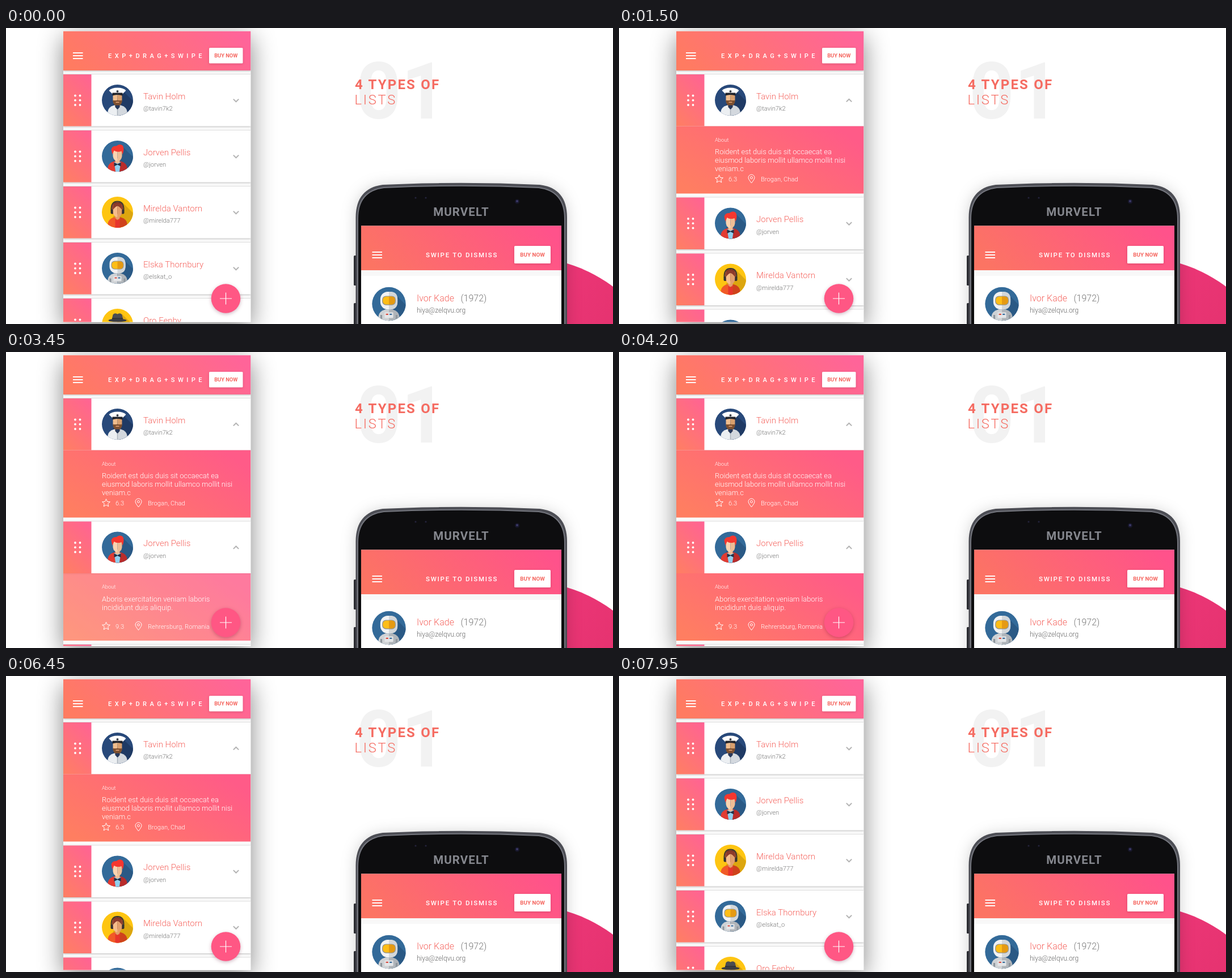
An HTML page that plays this animation: 1070 by 523 pixels, repeating every 8 s.

```html
<!DOCTYPE html>
<html lang="en">
<head>
<meta charset="utf-8">
<title>List types</title>
<style>
  html, body { margin: 0; width: 100%; height: 100%; overflow: hidden; background: #fff; }
  svg { display: block; width: 1070px; height: 523px; font-family: Roboto, sans-serif; }
  .name { font-weight: 300; font-size: 15px; fill: #f5655f; }
  .light { font-weight: 300; }
  .raised { filter: drop-shadow(0 1.5px 1.5px rgba(0,0,0,.25)); }
  .button { filter: drop-shadow(0 1px 2px rgba(90,0,30,.22)); }
  .fab { filter: drop-shadow(0 2px 3px rgba(90,0,40,.28)); }
  .deep { filter: drop-shadow(0 11px 22px rgba(0,0,0,.48)); }
  .soft { filter: drop-shadow(0 2px 13px rgba(0,0,0,.18)); }
</style>
</head>
<body>
<svg id="stage" viewBox="0 0 1070 523"></svg>
<script>
const LOOP = 8000, PITCH = 99, ROW_TOP = 82, ROW_H = 91.5, PANEL_H = 119;
const GROW = 118.5;

const rows = [
  { name: 'Tavin Holm', handle: '@tavin7k2', avatar: 'sailor',
    about: ['Roident est duis duis sit occaecat ea', 'eiusmod laboris mollit ullamco mollit nisi', 'veniam.c'],
    score: '6.3', place: 'Brogan, Chad',
    open: 270, close: 6750 },
  { name: 'Jorven Pellis', handle: '@jorven', avatar: 'redhead',
    about: ['Aboris exercitation veniam laboris', 'incididunt duis aliquip.'],
    score: '9.3', place: 'Rehrersburg, Romania',
    open: 2670, close: 4850 },
  { name: 'Mirelda Vantorn', handle: '@mirelda777', avatar: 'operator' },
  { name: 'Elska Thornbury', handle: '@elskat_o', avatar: 'astronaut' },
  { name: 'Oro Fenby', handle: '@orofen', avatar: 'hat' }
];

const rect = (x, y, w, h, fill, extra = '') =>
  `<rect x="${x}" y="${y}" width="${w}" height="${h}" fill="${fill}" ${extra}/>`;
const path = (d, fill, extra = '') => `<path d="${d}" fill="${fill}" ${extra}/>`;
const circle = (x, y, r, fill, extra = '') =>
  `<circle cx="${x}" cy="${y}" r="${r}" fill="${fill}" ${extra}/>`;
const text = (x, y, size, fill, str, extra = '') =>
  `<text x="${x}" y="${y}" font-size="${size}" fill="${fill}" ${extra}>${str}</text>`;
const gradient = (id, [x1, y1, x2, y2], from, to, extra = '') =>
  `<linearGradient id="${id}" x1="${x1}" y1="${y1}" x2="${x2}" y2="${y2}" ${extra}>
    <stop stop-color="${from}"/><stop offset="1" stop-color="${to}"/></linearGradient>`;
const menuIcon = (x, y) => [0, 5, 10].map(d => rect(x, y + d - 1, 17.5, 1.9, '#fff')).join('');
const buyButton = (x, y, w, h, size) =>
  `<g class="button">${rect(x, y, w, h, '#fff', 'rx="1.5"')}</g>` +
  text(x + w / 2, y + h / 2 + size * .36, size, '#f5665f', 'BUY NOW', 'font-weight="700" text-anchor="middle"');

// Avatars are drawn around (0,0) inside a circle of radius 27.5.
const suit = (left, right) =>
  path('M-17 30V20Q-16 12-6 9H0V30Z', left) + path('M17 30V20Q16 12 6 9H0V30Z', right);
const head = (left, right) =>
  rect(-4, 4, 8, 9, right) + path('M0-13H-8V0Q-7 8 0 9Z', left) + path('M0-13H8V0Q7 8 0 9Z', right);
const longShadow = fill => path('M8-18L34 8V34H0L-10 12Z', fill);

const avatars = {
  sailor: circle(0, 0, 28, '#28497a') + longShadow('#1f3a64') + suit('#eceff2', '#d3d8de') +
    head('#f0bd8d', '#d99f6d') +
    path('M-8 0Q-4 1 0 0Q4 1 8 0V3Q6 10 0 11Q-6 10-8 3Z', '#7d5030') + rect(-3, 3, 6, 1.5, '#e8a579') +
    path('M-4 12L0 17L4 12V9H-4Z', '#26395c') + rect(-.7, 16, 1.4, 14, '#a9b1ba') +
    path('M-15-17Q-10-22 0-22Q10-22 15-17L9-11H-9Z', '#fff') + path('M-9-13H9V-8Q0-11-9-8Z', '#20232b') +
    circle(0, -15.5, 2, '#3a3f4a'),
  redhead: circle(0, 0, 28, '#336a99') + longShadow('#2a5985') + suit('#e23b32', '#b92c2b') +
    head('#fbd3b0', '#eebd95') +
    path('M-9-3L-11-12Q-9-19-2-18Q4-23 9-19Q13-14 9-3L7-9Q0-6-6-10Z', '#f5372f') +
    path('M-6 10L0 13L6 10L3 30H-3Z', '#8fd0ef') +
    path('M-6 11L0 14L6 11V18L0 15L-6 18Z', '#263247'),
  operator: circle(0, 0, 28, '#fec512') + longShadow('#dca60f') +
    path('M-10 3V-9Q-9-18 0-18Q9-18 10-9V3Z', '#7b3327') + suit('#f15a27', '#cf421c') +
    head('#f6bd8c', '#e3a06c') + path('M-8-4V-13Q0-19 8-13V-4Q4-10 0-11Q-4-10-8-4Z', '#8d3b2b') +
    path('M-11-3Q-12-19 0-19Q12-19 11-3', 'none', 'stroke="#333" stroke-width="1.8"') +
    rect(-12, -5, 4, 8, '#333', 'rx="2"') + rect(8, -5, 4, 8, '#333', 'rx="2"') +
    path('M-4 10L0 15L4 10V30H-4Z', '#e7352c'),
  astronaut: circle(0, 0, 28, '#336a99') + longShadow('#2a5985') + suit('#cfd2d5', '#b0b5ba') +
    path('M-14 30V18H-11V30M11 30V18H14V30', '#8f969d') +
    rect(-14, -20, 28, 29, '#f1f2f3', 'rx="12"') + path('M0-20H2Q14-20 14-8V-3Q14 9 2 9H0Z', '#d3d7da') +
    rect(-11, -13, 22, 15, '#8d8f90', 'rx="6"') + rect(-10, -12, 20, 13, '#fdbd17', 'rx="5.5"') +
    path('M0-12H4.5Q10-12 10-6Q10 1 4.5 1H0Z', '#e59a13') +
    rect(-7, 14, 14, 9, '#e4e6e8', 'rx="1"') + rect(-5, 16, 4, 2, '#d9493c') + rect(1, 16, 4, 2, '#356b9b'),
  hat: circle(0, 0, 28, '#fec512') + longShadow('#dca60f') + suit('#565a60', '#404349') +
    head('#f3bf90', '#dda374') +
    path('M-10-8L-8-17Q-5-21 0-18Q5-21 8-17L10-8Z', '#4a4c51') + rect(-9.5, -11, 19, 3, '#2a2b30') +
    '<ellipse cx="0" cy="-7" rx="16" ry="3" fill="#3b3d43"/>'
};
const avatar = (kind, x, y, scale = 1) =>
  `<g transform="translate(${x} ${y}) scale(${scale})" clip-path="url(#disc)">${avatars[kind]}</g>`;

const star = Array.from({ length: 10 }, (_, i) => {
  const a = -Math.PI / 2 + i * Math.PI / 5, r = i % 2 ? 3.3 : 7.3;
  return `${i ? 'L' : 'M'}${(r * Math.cos(a)).toFixed(2)} ${(r * Math.sin(a)).toFixed(2)}`;
}).join('') + 'Z';

function panel(row) {
  const outline = 'stroke="#fff" stroke-width="1"';
  return `<g class="panel light" opacity="0">
    ${rect(101, ROW_H, 330.5, PANEL_H, 'url(#item)')}
    ${text(169, 118.5, 9.4, '#fff', 'About')}
    ${row.about.map((line, i) => text(169, 141 + i * 15, 12.9, '#fff', line)).join('')}
    ${path(star, 'none', `${outline} stroke-linejoin="round" transform="translate(176.5 185)"`)}
    ${text(193, 189, 11.2, '#fff', row.score)}
    ${path('M233.5 192Q228 185 228 182.5A5.5 5.5 0 0 1 239 182.5Q239 185 233.5 192Z', 'none', outline)}
    ${circle(233.5, 182.5, 2, 'none', outline)}
    ${text(250, 189, 11.2, '#fff', row.place)}
  </g>`;
}

function rowMarkup(row) {
  let dots = '';
  for (const x of [122, 130.5]) for (const y of [37.5, 45.7, 54]) dots += circle(x, y, 1.9, '#fff');
  return `<g class="row">
    ${rect(101, -1, 330.5, 1, '#e6e6e6')}
    <g class="raised">${rect(101, 0, 330.5, ROW_H, '#fff')}</g>
    ${rect(101, 0, 49.5, ROW_H, 'url(#strip)')}
    ${row.about ? panel(row) : ''}
    ${dots}
    ${avatar(row.avatar, 196.5, 45.5)}
    ${text(242, 43.5, 15, '', row.name, 'class="name"')}
    ${text(242, 64, 11.2, '#777', row.handle, 'class="light"')}
    ${path('M-4.7-2.4L0 2.3L4.7-2.4', 'none', 'class="chevron" stroke="#b4b4b4" stroke-width="2"')}
  </g>`;
}

const listPhone = `
  <g class="deep">${rect(101, 5.5, 330.5, 514, '#fafafa')}</g>
  <g clip-path="url(#card)">
    ${rows.map(rowMarkup).join('')}
    <g class="raised">${rect(101, 5.5, 330.5, 69.5, 'url(#bar)')}</g>
    ${menuIcon(118, 44)}
    ${text(180, 53, 11.1, '#fff', 'EXP+DRAG+SWIPE', 'font-weight="500" letter-spacing="5.45"')}
    ${buyButton(358, 35, 59.5, 27.5, 9.3)}
    <g class="fab">${circle(387.5, 478, 25.8, '#ff5784')}</g>
    ${path('M377 478H398M387.5 467.5V488.5', 'none', 'stroke="#fff" stroke-width="1.2"')}
  </g>`;

const title = `
  ${text(617, 160, 139, '#f2f2f2', '01', 'font-weight="700"')}
  ${text(615, 108, 24, '#f56c62', '4 TYPES OF', 'font-weight="700" letter-spacing="2.2"')}
  ${text(614.5, 134.5, 23.7, '#f56c62', 'LISTS', 'class="light" letter-spacing="2.75"')}`;

const body = 'M616.5 540V335C616.5 300 633 281 664 277Q802 270.5 941 277C973 281 989 300 989 335V540Z';
const bezel = 'M620 540V337C620 305 635 286 666 282Q802 275.5 939 282C970 286 985 305 985 337V540Z';
const samplePhone = `
  ${circle(915, 662, 257, 'url(#blob)')}
  ${rect(613, 402, 5, 53, '#303137', 'rx="1.5"')}${rect(613, 486, 5, 50, '#303137', 'rx="1.5"')}
  <g class="soft">${path(body, '#4c4d54')}</g>
  ${path(bezel, '#0d0d0f', 'stroke="#74767e" stroke-width="2"')}
  ${circle(722, 300, 1.6, '#24233c')}${circle(740, 300, 1.6, '#24233c')}
  ${circle(901, 306.5, 4, '#17172a')}${circle(901, 306, 2, '#3b3968')}
  ${text(802.5, 332, 20.5, '#85878e', 'MURVELT', 'font-weight="700" letter-spacing="1.1" text-anchor="middle"')}
  ${rect(626, 349.5, 353, 180, '#fff')}
  ${rect(626, 428, 353, 10, '#f8f8f8')}
  ${rect(626, 349.5, 353, 78.5, 'url(#bar2)')}
  ${menuIcon(645.5, 396)}
  ${text(740, 405, 11.5, '#fff', 'SWIPE TO DISMISS', 'font-weight="500" letter-spacing="1.75"')}
  ${buyButton(896, 385, 64, 31, 9.8)}
  ${avatar('astronaut', 675, 487.5, 1.08)}
  <text x="724" y="483" class="light" font-size="16" fill="#f5655f">Ivor Kade
    <tspan x="801.5" fill="#777">(1972)</tspan></text>
  ${text(724, 503, 12, '#666', 'hiya@zelqvu.org', 'class="light"')}`;

const stage = document.getElementById('stage');
stage.innerHTML = `<defs>
  ${gradient('bar', [0, .6, 1, .4], '#ff7b61', '#ff6499')}
  ${gradient('bar2', [0, .6, 1, .4], '#fc7463', '#ff528b')}
  ${gradient('strip', [90, 81, 161, 10], '#ff7f62', '#ff6295', 'gradientUnits="userSpaceOnUse"')}
  ${gradient('item', [0, .8, 1, .3], '#ff7e61', '#ff5b88')}
  ${gradient('blob', [.5, 0, 1, .4], '#ee3879', '#e02f6a')}
  <clipPath id="disc"><circle r="27.5"/></clipPath>
  <clipPath id="card"><rect x="101" y="5.5" width="330.5" height="514"/></clipPath>
</defs>${title}${samplePhone}${listPhone}`;

const views = [...stage.querySelectorAll('.row')].map(el => ({
  el, panel: el.querySelector('.panel'), chevron: el.querySelector('.chevron')
}));

const ramp = (t, start, length) => Math.min(1, Math.max(0, (t - start) / length));
const smooth = p => (1 - Math.cos(Math.PI * p)) / 2;

function draw(now) {
  const t = now % LOOP;
  let shift = 0;
  rows.forEach((row, i) => {
    const { el, panel, chevron } = views[i];
    el.setAttribute('transform', `translate(0 ${ROW_TOP + i * PITCH + shift})`);
    let turn = 0;
    if (row.about) {
      // Opening grows, then fades in; closing fades out, then shrinks.
      const { open, close } = row;
      shift += GROW * (smooth(ramp(t, open, 500)) - smooth(ramp(t, close + 450, 500)));
      panel.setAttribute('opacity', ramp(t, open + 500, 350) - ramp(t, close, 450));
      turn = 180 * (ramp(t, open, 560) - ramp(t, close, 800));
    }
    chevron.setAttribute('transform', `translate(405.5 46) rotate(${turn})`);
  });
  requestAnimationFrame(draw);
}
requestAnimationFrame(draw);
</script>
</body>
</html>
```
